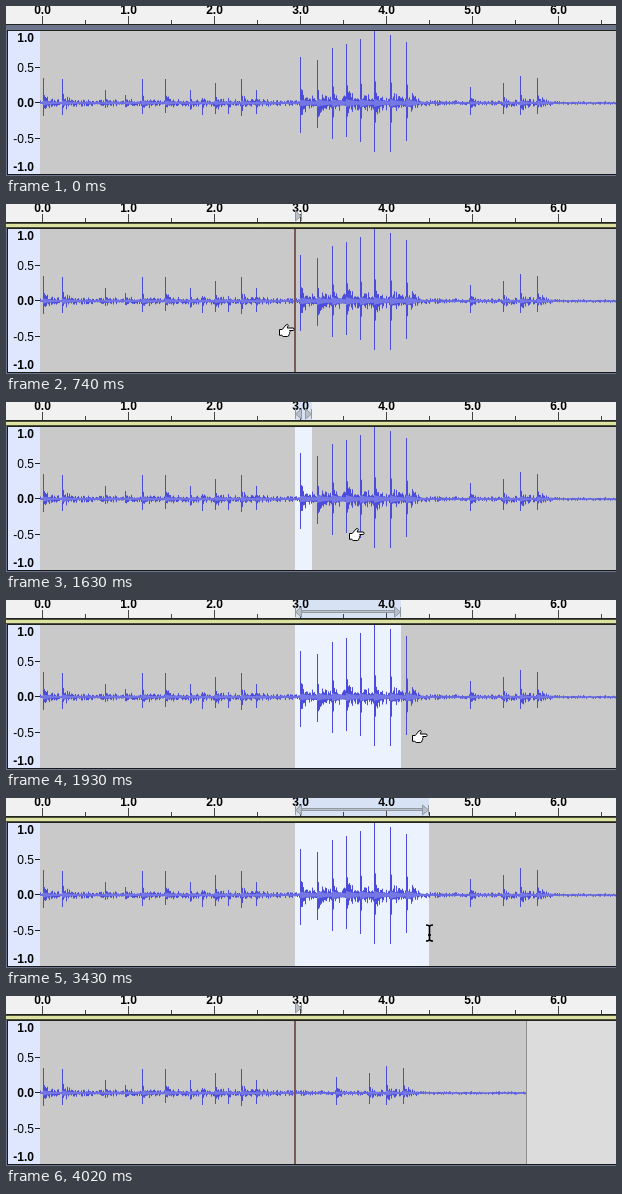
An HTML page for the animation above (4770 ms loop, 610 by 170 pixels).

```html
<!DOCTYPE html>
<html lang="en">
<head>
<meta charset="utf-8">
<title>Deleting a selection from an audio track</title>
<style>
  html, body { margin: 0; width: 610px; height: 170px; overflow: hidden; background: #fff; }
  svg { display: block; }
  text { font: 12px "Liberation Sans", Arial, sans-serif; fill: #000; }
  .bold { font-weight: bold; }
</style>
</head>
<body>
<svg id="stage" width="610" height="170" viewBox="0 0 610 170">
  <rect width="610" height="170" fill="#6d748d"/>
  <rect width="610" height="18" fill="#f1f1f1"/>
  <rect id="rulerSelection" width="0" height="18" fill="#d7e3f4"/>
  <g id="ruler"></g>
  <g id="handles" fill="#b9c0c9" stroke="#9299a2"></g>
  <g id="focusRing">
    <rect y="20" width="610" height="3" fill="#dde2a0"/>
    <path d="M0 19.5H610M0 23.5H610" stroke="#4c4e3c"/>
  </g>
  <path d="M0 18.5H610M1 24.5H610" stroke="#22231d"/>
  <rect y="25" x="1" width="609" height="143" fill="#c9c9c9"/>
  <rect id="emptyArea" x="520" y="25" width="90" height="143" fill="#dcdcdc"/>
  <path id="clipEnd" d="M520.5 25V168" stroke="#8d8d8d"/>
  <rect id="selection" y="25" width="0" height="143" fill="#ecf3fe"/>
  <g id="wave" fill="none"></g>
  <path id="playLine" d="M289 25V168" stroke="#7b5a55" stroke-width="2"/>
  <rect x="2" y="25" width="32" height="143" fill="#dfe7ff"/>
  <path d="M1.5 24V168M1 168.5H610" stroke="#191919"/>
  <g id="scale" text-anchor="end"></g>
  <g id="pointer" stroke="#000" stroke-linejoin="round">
    <path id="arrow" fill="#fff" d="M.5 .5V16.5L4.2 13L6.8 18.5L9 17.5L6.4 12H11.5Z"/>
    <path id="hand" fill="#fff" d="M.5 6.5H3.2L7 2Q9 .6 9.3 2.2L8.2 5H14.4Q16 6.2 14.4 7.5H10.6Q11.8 8.6 10.5 9.7Q11.2 10.8 9.9 11.8Q10 13.4 8.4 13.5H4.2L2.7 12.3H.5Z"/>
    <path id="beam" fill="none" stroke-width="1.6" d="M1 1Q4 1 4.5 2.5Q5 1 8 1M4.5 2V16M1 17Q4 17 4.5 15.5Q5 17 8 17M3 11H6"/>
  </g>
</svg>
<script>
const LOOP = 4770, MID = 97, CUT_START = 289, CUT_END = 423, TRACK_END = 654;
const $ = id => document.getElementById(id);

function add(parent, name, attrs, text = '') {
  const node = document.createElementNS('http://www.w3.org/2000/svg', name);
  for (const key in attrs) node.setAttribute(key, attrs[key]);
  node.textContent = text;
  return parent.appendChild(node);
}
const show = (id, on) => $(id).setAttribute('display', on ? 'inline' : 'none');

// Each click: x, height above and depth below the centre line
const clicks = [
  [37, 25, 13], [56, 24, 12], [99, 13, 5], [119, 8, 4], [136, 24, 11],
  [159, 24, 10], [184, 13, 4], [196, 5, 12], [209, 20, 11], [222, 5, 11],
  [235, 24, 13], [250, 13, 11], [294, 46, 30], [311, 43, 25], [326, 55, 36],
  [340, 59, 34], [354, 64, 39], [368, 72, 49], [384, 68, 49], [400, 61, 38],
  [464, 16, 12], [497, 20, 11], [514, 27, 12], [531, 25, 11]
];

function noise(n) {
  const v = Math.sin(n * 12.9898 + 4.1) * 43758.5453;
  return v - Math.floor(v);
}

function loudness(x) {
  let level = x > 545 ? 1.2 : x > 420 ? 1.8 : 2.2;
  if (x > 295 && x < 410) level += 2;
  for (const [at, up] of clicks) {
    if (x >= at) level += Math.min(up, 34) * .19 * Math.exp((at - x) / 6);
  }
  return level;
}

function wavePart(from, to) {
  let peaks = '', body = '';
  const line = (x, up, down) =>
    `M${x + .5} ${(MID - up).toFixed(1)}V${(MID + down).toFixed(1)}`;
  for (let x = from; x < to; x++) {
    const level = loudness(x);
    const up = level * (.4 + noise(x) ** 2 * 1.1);
    const down = level * (.4 + noise(x + 700) ** 2 * 1.1);
    peaks += line(x, up, down);
    body += line(x, level * .35, level * .35);
  }
  for (const [x, up, down] of clicks) {
    if (x >= from && x < to) {
      peaks += line(x, up, down) + line(x + 1, up * .3, down * .4);
    }
  }
  const part = add($('wave'), 'g', {});
  add(part, 'path', { d: peaks, stroke: '#4b4dda' });
  add(part, 'path', { d: body, stroke: '#7577e4' });
  return part;
}

wavePart(34, CUT_START);
const removed = wavePart(CUT_START, CUT_END);
const tail = wavePart(CUT_END, TRACK_END);

for (let i = 0; i < 14; i++) {
  const x = Math.round(36 + i * 43) + .5;
  add($('ruler'), 'path', { d: `M${x} ${i % 2 ? 14 : 10}V18`, stroke: '#444' });
  if (i % 2 === 0) {
    add($('ruler'), 'text', { x: 36.5 + i * 43, y: 8, 'text-anchor': 'middle', class: 'bold' },
      (i / 2).toFixed(1));
  }
}

for (const [label, y] of [['1.0', 36], ['0.5', 66], ['0.0', 101], ['-0.5', 137], ['-1.0', 165]]) {
  add($('scale'), 'text', { x: 28, y, class: label.endsWith('5') ? '' : 'bold' }, label);
}
add($('scale'), 'path', { d: 'M29 61.5H34M29 96.5H34M29 132.5H34', stroke: '#222' });

// Pointer steps: time, shape, left, top
const pointerSteps = [
  [0, ''], [150, 'arrow', 315, 142], [290, 'arrow', 298, 117], [440, 'arrow', 292, 118],
  [590, 'arrow', 283, 115], [740, 'hand', 273, 119], [890, 'hand', 288, 120],
  [1040, 'hand', 273, 122], [1480, 'hand', 286, 123], [1630, 'hand', 343, 125],
  [1780, 'hand', 380, 128], [1930, 'hand', 406, 129], [2080, 'hand', 408, 129],
  [3430, 'beam', 419, 126], [3580, 'beam', 421, 126], [3730, 'beam', 474, 136],
  [3870, 'beam', 557, 152], [4020, '']
];
const selectionSteps = [
  [0, 0], [1630, 306], [1780, 356], [1930, 395], [2080, 422], [2230, 423], [3580, 0]
];
const stepAt = (steps, t) => steps.filter(step => step[0] <= t).pop();

function handlePath(end) {
  if (!end) return 'M289.5 7V17L295 12ZM295.5 7V17';
  const right = end - .5;
  const shaft = end > 312 ? `M296 10.5H${end - 7}V12.5H296Z` : '';
  return `${shaft}M289.5 12L295.5 7V17ZM${right} 12L${right - 6} 7V17Z` +
    `M289.5 7V17M${right} 7V17`;
}
const handles = add($('handles'), 'path', {});

function render(t) {
  const [, shape, left, top] = stepAt(pointerSteps, t);
  const end = stepAt(selectionSteps, t)[1];
  const focused = t >= 740, deleted = t >= 3580;

  for (const id of ['arrow', 'hand', 'beam']) show(id, id === shape);
  if (shape) $('pointer').setAttribute('transform', `translate(${left} ${top})`);

  for (const id of ['selection', 'rulerSelection']) {
    $(id).setAttribute('x', CUT_START);
    $(id).setAttribute('width', end ? end - CUT_START : 0);
  }
  handles.setAttribute('d', handlePath(end));
  show('handles', end || (t >= 740 && t < 890) || t >= 4020);
  show('playLine', focused && !end);
  show('focusRing', focused);
  show('emptyArea', deleted);
  show('clipEnd', deleted);
  removed.setAttribute('display', deleted ? 'none' : 'inline');
  tail.setAttribute('transform', `translate(${deleted ? CUT_START - CUT_END : 0} 0)`);
}

const start = performance.now();
function tick(now) {
  render(Math.max(0, now - start) % LOOP);
  requestAnimationFrame(tick);
}
render(0);
requestAnimationFrame(tick);
</script>
</body>
</html>
```
